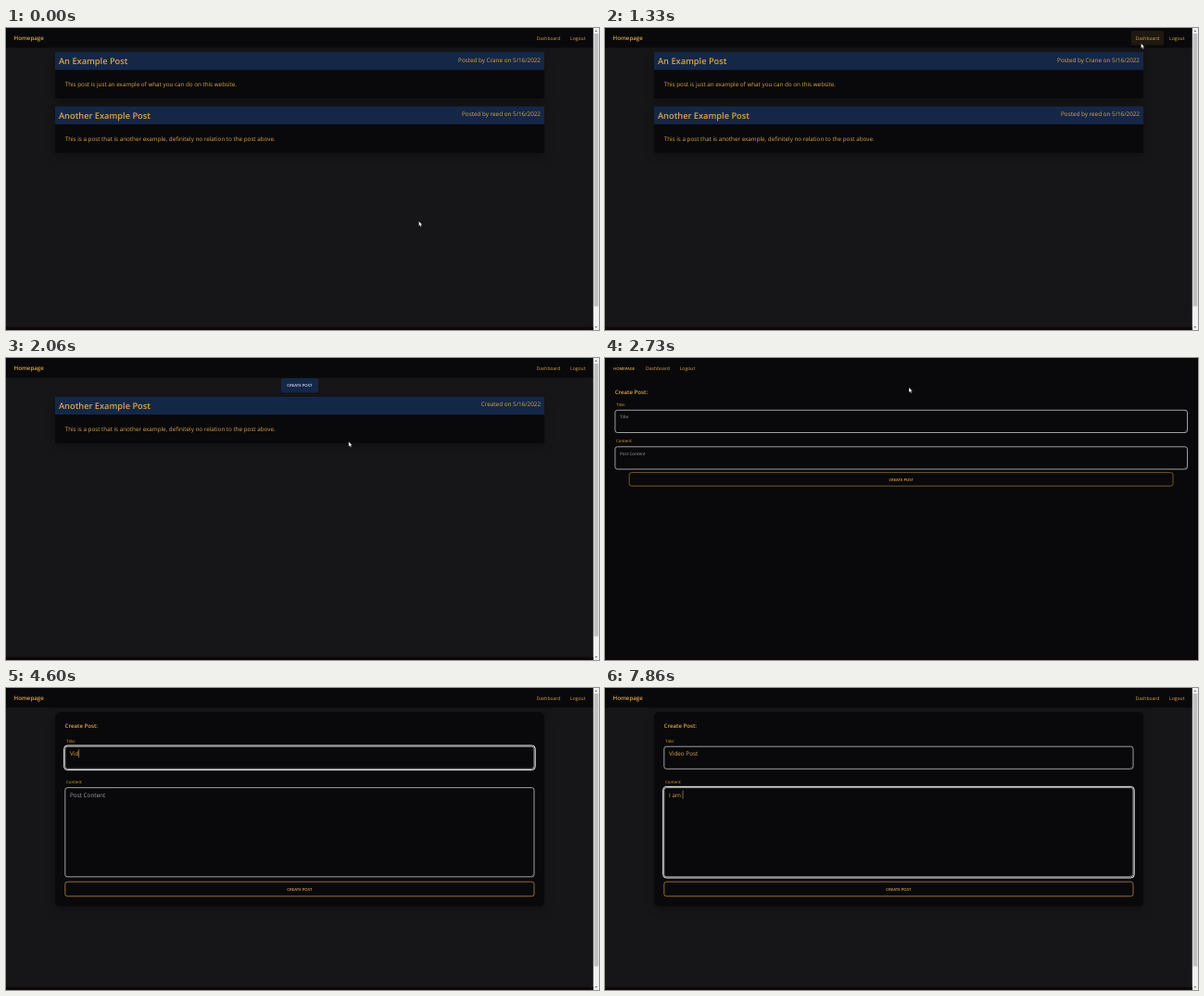
An HTML page that plays this animation: 640x326 px, repeating every 8000 ms.

```html
<!DOCTYPE html>
<html lang="en">
<head>
<meta charset="utf-8">
<title>Blog walkthrough</title>
<style>
  html, body { margin: 0; width: 100%; height: 100%; overflow: hidden; background: #09090b; }
  svg { display: block; width: 640px; height: 326px; }
  text {
    font-family: "Open Sans", "Noto Sans", sans-serif;
    fill: #dca54c; white-space: pre; text-rendering: geometricPrecision;
  }
  .card { filter: drop-shadow(0 4px 4px rgba(0, 0, 0, .25)); }
</style>
</head>
<body>
<svg id="stage" viewBox="0 0 640 326"></svg>
<script>
const LOOP = 8000, FPS = 15;
const GOLD = '#dca54c', BLACK = '#09090b', GREY = '#161517', NAVY = '#152747';
const stage = document.getElementById('stage');

function add(parent, tag, attrs, content) {
  const el = document.createElementNS('http://www.w3.org/2000/svg', tag);
  for (const key in attrs) el.setAttribute(key, attrs[key]);
  if (content) el.textContent = content;
  return parent.appendChild(el);
}
const group = (parent, attrs) => add(parent, 'g', attrs);
const rect = (parent, x, y, width, height, fill, more) =>
  add(parent, 'rect', { x, y, width, height, fill, ...more });
const label = (parent, x, y, size, content, more) =>
  add(parent, 'text', { x, y, 'font-size': size, ...more }, content);
const SEMI = { 'font-weight': 600 };
const END = { 'text-anchor': 'end' };
const MID = { 'text-anchor': 'middle', ...SEMI };
const show = (el, on) => el.setAttribute('visibility', on ? 'visible' : 'hidden');

function outline(parent, x, y, w, h, stroke, width, rx = 2.5) {
  return rect(parent, x, y, w, h, 'none', { stroke, 'stroke-width': width, rx });
}

function area(parent, x, y, w, h) {
  outline(parent, x, y, w, h, '#d2d2d2', .75);
  const r = x + w - 1, b = y + h - 1;
  add(parent, 'path', {
    d: `M${r - 2} ${b}L${r} ${b - 2}M${r - .8} ${b}L${r} ${b - .8}`,
    stroke: '#8a8a8a', 'stroke-width': .35
  });
  return outline(parent, x - 1.2, y - 1.2, w + 2.4, h + 2.4, '#fff', .9, 3.6);
}

function post(parent, y, title, note, body) {
  const g = group(parent, { class: 'card' });
  rect(g, 53, y, 528, 50.2, BLACK, { rx: .6 });
  rect(g, 53, y, 528, 19.5, NAVY);
  label(g, 57, y + 13.4, 9.25, title, SEMI);
  label(g, 577, y + 10.8, 6.33, note, END);
  label(g, 63.7, y + 37.5, 6.29, body);
}

// Page frame shared by the styled pages
const site = group(stage);
rect(site, 0, 0, 640, 326, GREY);
rect(site, 0, 0, 634, 21.3, BLACK);
const linkHover = rect(site, 567.8, 3, 35.4, 15.6, GOLD, { rx: 2, opacity: .1 });
label(site, 8.5, 13.2, 6.2, 'Homepage', SEMI);
label(site, 572.5, 12.7, 5, 'Dashboard');
label(site, 609, 12.7, 5.1, 'Logout');

const anotherPost = ['Another Example Post',
  'This is a post that is another example, definitely no relation to the post above.'];

const home = group(stage);
post(home, 25.8, 'An Example Post', 'Posted by Crane on 5/16/2022',
  'This post is just an example of what you can do on this website.');
post(home, 84.5, anotherPost[0], 'Posted by reed on 5/16/2022', anotherPost[1]);

const dash = group(stage);
const createBtn = rect(dash, 296.8, 22, 40.2, 15.4, NAVY, { rx: 2 });
label(dash, 316.9, 31.2, 4.3, 'CREATE POST', { ...MID, style: 'fill:#cfdcf2' });
post(dash, 41.6, anotherPost[0], 'Created on 5/16/2022', anotherPost[1]);

// The form before its styles arrive
const raw = group(stage);
rect(raw, 0, 0, 640, 326, BLACK);
label(raw, 9, 12.5, 4.2, 'HOMEPAGE', SEMI);
label(raw, 44, 12.8, 5, 'Dashboard');
label(raw, 80.7, 12.8, 5.1, 'Logout');
label(raw, 10.7, 39.3, 6.1, 'Create Post:', SEMI);
label(raw, 12, 51.6, 4.4, 'Title:');
label(raw, 12, 91.1, 4.4, 'Content:');
for (const [y, hint] of [[56.3, 'Title'], [95.8, 'Post Content']]) {
  show(area(raw, 10.9, y, 617.6, 24.2), false);
  label(raw, 16, y + 9.1, 4.55, hint, { style: 'fill:#a3a3a3' });
}
outline(raw, 26.2, 123.6, 586.8, 14.6, '#8c6c34', .8);
label(raw, 319.7, 132.5, 4.2, 'CREATE POST', MID);

// The styled form
const form = group(stage);
rect(form, 53, 25.8, 528, 209.8, BLACK, { rx: 5, class: 'card' });
label(form, 63.6, 43.3, 6.1, 'Create Post:', SEMI);
label(form, 65, 58.6, 4.4, 'Title:');
label(form, 65, 103, 4.4, 'Content:');
outline(form, 63.8, 209.2, 506.2, 15.6, '#b5883f', .8);
label(form, 316.9, 218.5, 4.3, 'CREATE POST', MID);

// keys: [tick, text so far]; the caret blinks from the last key or focus
function field(y, h, hint, focus, blur, keys) {
  const ring = area(form, 63.8, y, 506.2, h);
  const text = label(form, 69, y + 10.1, 6.35, hint);
  const caret = rect(form, 69, y + 3, .6, 9, GOLD);
  return k => {
    const key = keys.filter(([at]) => at <= k).pop();
    text.textContent = key ? key[1] : hint;
    text.style.fill = key ? GOLD : '#a3a3a3';
    const since = k - (key ? key[0] : focus);
    show(caret, since >= 0 && k < blur && Math.floor(since / 7.5) % 2 === 0);
    caret.setAttribute('x', 69.2 + (key ? text.getComputedTextLength() : 0));
    ring.setAttribute('opacity', clamp((k - focus + 1) / 3) * (1 - clamp((k - blur + 1) / 3)));
    show(ring, k >= focus - 1);
  };
}
const clamp = v => Math.max(0, Math.min(1, v));

const fields = [
  field(63.2, 24.1, 'Title', 51, 100, [
    [64, 'V'], [67, 'Vi'], [69, 'Vid'], [72, 'Vide'], [74, 'Video'], [76, 'Video '],
    [84, 'Video P'], [87, 'Video Po'], [88, 'Video Pos'], [90, 'Video Post']]),
  field(107.6, 96.2, 'Post Content', 100, 999, [
    [113, 'I'], [115, 'I a'], [116, 'I am'], [118, 'I am ']])
];

// Scrollbar and bottom edge
const bar = group(stage);
rect(stage, 0, 322.8, 634, 3.2, '#0d0709');
rect(bar, 633.8, 0, 6.2, 326, '#f1f1f1');
rect(bar, 634.5, 6, 4.8, 294.5, '#c1c1c1');
add(bar, 'path', { d: 'M635.6 3.8l1.3-1.5 1.3 1.5zM635.6 322.3l1.3 1.5 1.3-1.5z', fill: '#505050' });

const cursor = add(stage, 'path', {
  d: 'M0 0V5.4L1.25 4.3 2.1 6.2 3 5.8 2.2 3.9H3.9Z',
  fill: '#fff', stroke: '#000', 'stroke-width': .3
});

// [tick, x, y]
const path = [[1, 445.5, 208.5], [19, 578.5, 16.5], [24, 578.5, 16.5], [31, 369.8, 90.3],
  [36, 326, 34], [41, 328, 31.8], [45, 322, 68]];

function pointer(k) {
  const i = path.findIndex(p => p[0] > k);
  if (i === 0) return path[0].slice(1);
  if (i < 0) return path[path.length - 1].slice(1);
  const [t0, x0, y0] = path[i - 1], [t1, x1, y1] = path[i];
  const u = (k - t0) / (t1 - t0), e = u * u * (3 - 2 * u);
  return [x0 + (x1 - x0) * e, y0 + (y1 - y0) * e];
}

function draw(ms) {
  const k = Math.floor((ms + 7) * FPS / 1000);
  const page = k < 23 ? home : k < 40 ? dash : k < 42 ? raw : form;
  for (const p of [home, dash, raw, form]) p.style.display = p === page ? '' : 'none';
  show(bar, page !== raw);

  const [x, y] = pointer(k);
  cursor.setAttribute('transform', `translate(${x} ${y})`);
  show(cursor, page !== form || y < 62);
  show(linkHover, x > 568 && x < 603 && y < 18.6);
  createBtn.setAttribute('fill', x > 297 && x < 337 && y > 22 && y < 37.4 ? '#0f1d37' : NAVY);
  if (page === form) fields.forEach(update => update(k));
}

const start = performance.now();
(function frame() {
  draw((performance.now() - start) % LOOP);
  requestAnimationFrame(frame);
})();
</script>
</body>
</html>
```
